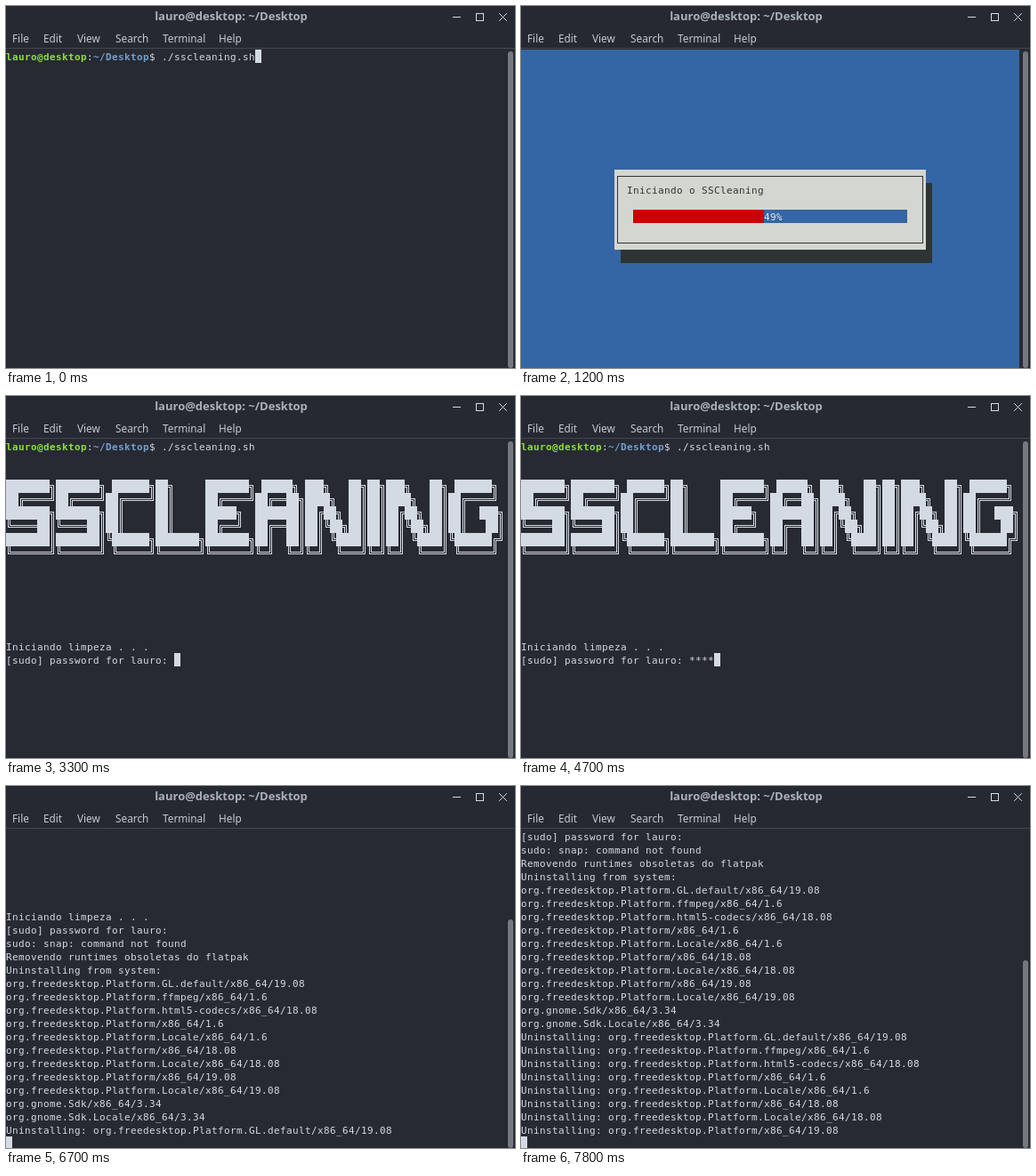
An HTML page with a canvas that plays this animation: 572x407 px, repeating every 8000 ms.

```html
<!DOCTYPE html>
<html lang="pt-BR">
<head>
<meta charset="utf-8">
<title>SSCleaning</title>
<style>
html, body { margin: 0; width: 100%; height: 100%; overflow: hidden; background: #282a33; }
canvas { display: block; }
</style>
</head>
<body>
<canvas id="stage" width="572" height="407"></canvas>
<script>
const ctx = document.getElementById('stage').getContext('2d');
const LOOP = 8000, CW = 7, CH = 15, TOP = 49;
const MONO = '11px "DejaVu Sans Mono", monospace';
const BG = '#282a33', FG = '#d3dae3', INK = '#2e3436', PAPER = '#d3d7cf',
      RED = '#cc0000', BLUE = '#3465a4', PALE = '#eeeeec';
const USER = 'lauro', HOST = USER + '@desktop', DIR = '~/Desktop';

const GLYPHS = {
  S: ['███████╗', '██╔════╝', '███████╗', '╚════██║', '███████║', '╚══════╝'],
  C: [' ██████╗', '██╔════╝', '██║     ', '██║     ', '╚██████╗', ' ╚═════╝'],
  L: ['██╗     ', '██║     ', '██║     ', '██║     ', '███████╗', '╚══════╝'],
  E: ['███████╗', '██╔════╝', '█████╗  ', '██╔══╝  ', '███████╗', '╚══════╝'],
  A: [' █████╗ ', '██╔══██╗', '███████║', '██╔══██║', '██║  ██║', '╚═╝  ╚═╝'],
  N: ['███╗   ██╗', '████╗  ██║', '██╔██╗ ██║', '██║╚██╗██║', '██║ ╚████║', '╚═╝  ╚═══╝'],
  I: ['██╗', '██║', '██║', '██║', '██║', '╚═╝'],
  G: [' ██████╗ ', '██╔════╝ ', '██║  ███╗', '██║   ██║', '╚██████╔╝', ' ╚═════╝ ']
};
const CORNERS = { '╔': [1, 1], '╗': [-1, 1], '╚': [1, -1], '╝': [-1, -1] };

const FD = 'org.freedesktop.Platform';
const REFS = [
  FD + '.GL.default/x86_64/19.08', FD + '.ffmpeg/x86_64/1.6', FD + '.html5-codecs/x86_64/18.08',
  FD + '/x86_64/1.6', FD + '.Locale/x86_64/1.6', FD + '/x86_64/18.08', FD + '.Locale/x86_64/18.08',
  FD + '/x86_64/19.08', FD + '.Locale/x86_64/19.08', 'org.gnome.Sdk/x86_64/3.34',
  'org.gnome.Sdk.Locale/x86_64/3.34'
];

const KEY_TIMES = [4300, 4400, 4500, 4700, 4800, 5000, 5200, 5300, 5500, 5700, 5800];
const GAUGE_TIMES = [500, 600, 700, 800, 900, 1000, 1200, 1300, 1400, 1500, 1600, 1700, 1800];
const passed = (times, t) => times.filter(x => x <= t).length;

function box(x, y, w, h, color) {
  ctx.fillStyle = color;
  ctx.fillRect(x, y, w, h);
}

function cells(col, row, w, h, color) {
  box(col * CW, TOP + row * CH, w * CW, h * CH, color);
}

// Terminal text: one glyph per grid cell.
function put(col, row, str, color = FG, bold = false) {
  ctx.font = (bold ? 'bold ' : '') + MONO;
  ctx.fillStyle = color;
  [...str].forEach((c, i) => {
    if (c !== ' ') ctx.fillText(c, (col + i) * CW, TOP + row * CH + 12);
  });
}

function label(str, x, y, font, color, align = 'left') {
  ctx.font = font;
  ctx.fillStyle = color;
  ctx.textAlign = align;
  ctx.fillText(str, x, y);
  ctx.textAlign = 'left';
}

function cursor(col, row) {
  cells(col, row, 1, 1, FG);
}

function chrome() {
  box(0, 0, 572, 407, BG);
  box(0, 0, 572, 47, '#272932');
  box(0, 47, 572, 1, '#44474f');
  label(HOST + ': ' + DIR, 253, 16, 'bold 13px "Open Sans", "Noto Sans", sans-serif', '#a9b1bc', 'center');
  const menu = [['File', 7], ['Edit', 42], ['View', 80], ['Search', 123], ['Terminal', 176], ['Help', 239]];
  for (const [name, x] of menu) label(name, x, 41, '11.8px "Noto Sans", sans-serif', '#c3c9d2');
  ctx.strokeStyle = FG;
  ctx.lineWidth = 1;
  ctx.strokeRect(528.5, 8.5, 8, 8);
  ctx.lineCap = 'square';
  ctx.beginPath();
  ctx.moveTo(502.5, 12.5); ctx.lineTo(510.5, 12.5);
  ctx.moveTo(554.5, 8.5); ctx.lineTo(562.5, 16.5);
  ctx.moveTo(562.5, 8.5); ctx.lineTo(554.5, 16.5);
  ctx.stroke();
}

function scrollbar(scrolled) {
  const y = Math.round(51 + 353 * scrolled / (scrolled + 23));
  ctx.fillStyle = '#75787f';
  ctx.beginPath();
  ctx.roundRect(564, y, 6, 407 - y, 3);
  ctx.fill();
}

function prompt(row) {
  put(0, row, HOST, '#8ae234', true);
  put(13, row, ':');
  put(14, row, DIR, '#729fcf', true);
  put(23, row, '$ ./sscleaning.sh');
}

// Double-line box characters, drawn inside a 7x15 cell.
function boxChar(c, x, y) {
  if (c === '█') return box(x, y, CW, CH, FG);
  for (const s of [-1, 1]) {
    if (c === '═') box(x, y + 7 + s, CW, 1, FG);
    else if (c === '║') box(x + 3 + s, y, 1, CH, FG);
    else if (CORNERS[c]) {
      const [dx, dy] = CORNERS[c], cx = 3 + s * dx, cy = 7 + s * dy;
      if (dx > 0) box(x + cx, y + cy, CW - cx, 1, FG);
      else box(x, y + cy, cx + 1, 1, FG);
      if (dy > 0) box(x + cx, y + cy, 1, CH - cy, FG);
      else box(x + cx, y, 1, cy + 1, FG);
    }
  }
}

function banner(row) {
  for (let r = 0; r < 6; r++) {
    const line = [...'SSCLEANING'].map(l => GLYPHS[l][r]).join('');
    [...line].forEach((c, i) => boxChar(c, i * CW, TOP + (row + r) * CH));
  }
}

function dialog(col, row, w, h) {
  box(0, TOP, 560, 407 - TOP, BLUE);
  cells(col + 1, row + 1, w, h, INK);
  cells(col, row, w, h, PAPER);
  ctx.strokeStyle = INK;
  ctx.lineWidth = 1;
  ctx.strokeRect(col * CW + 3.5, TOP + row * CH + 7.5, (w - 1) * CW, (h - 1) * CH);
}

function gauge(percent) {
  dialog(15, 9, 50, 6);
  put(17, 10, 'Iniciando o SSCleaning', INK);
  cells(18, 12, 44, 1, BLUE);
  cells(18, 12, Math.floor(percent * 44 / 100), 1, RED);
  put(38, 12, String(percent).padStart(3) + '%', PALE);
}

function welcome() {
  dialog(10, 7, 60, 10);
  cells(26, 7, 28, 1, PAPER);
  box(182, 161, 4, 1, INK);
  box(185, 154, 1, CH, INK);
  box(374, 154, 1, CH, INK);
  box(374, 161, 4, 1, INK);
  put(29, 7, 'Seja bem-vindo(a)' + USER, RED);
  ['SSCleaning é um simples shell script que foi criado para',
   'fazer a limpeza automatizada do sistema.',
   'No próximo passo irá te pedir a senha de usuário.',
   'Deseja continuar ?'].forEach((s, i) => put(12, 9 + i, s, INK));
  cells(26, 14, 5, 1, RED);
  put(26, 14, '<Yes>', PALE);
  put(49, 14, '<No>', INK);
}

function password(t) {
  const stars = passed(KEY_TIMES, t);
  prompt(0);
  banner(3);
  put(0, 15, 'Iniciando limpeza . . .');
  put(0, 16, '[sudo] password for ' + USER + ': ' + '*'.repeat(stars));
  if (t < 3800 || t >= 4300) cursor(27 + stars, 16);
}

function cleaning(t) {
  const removed = t < 6700 ? 0 : t < 6800 ? 1 : t < 7300 ? 4 : t < 7700 ? 6 : t < 7800 ? 7 : 8;
  const scrolled = removed ? removed + 8 : 0;
  const lines = ['Iniciando limpeza . . .', '[sudo] password for ' + USER + ':',
    'sudo: snap: command not found', 'Removendo runtimes obsoletas do flatpak'];
  if (removed) {
    lines.push('Uninstalling from system:', ...REFS);
    lines.push(...REFS.slice(0, removed).map(r => 'Uninstalling: ' + r));
  } else {
    prompt(0);
    banner(3);
  }
  lines.forEach((s, i) => {
    const row = 15 + i - scrolled;
    if (row >= 0) put(0, row, s);
  });
  if (t < 7100 || t >= 7700) cursor(0, 15 + lines.length - scrolled);
  return scrolled;
}

function draw(t) {
  let scrolled = 0;
  chrome();
  if (t < 300) {
    prompt(0);
    cursor(40, 0);
  } else if (t < 1900) gauge(7 * passed(GAUGE_TIMES, t));
  else if (t < 3300) welcome();
  else if (t < 6500) password(t);
  else scrolled = cleaning(t);
  scrollbar(scrolled);
}

const start = performance.now();
function tick() {
  draw((performance.now() - start) % LOOP);
  requestAnimationFrame(tick);
}
tick();
</script>
</body>
</html>
```
